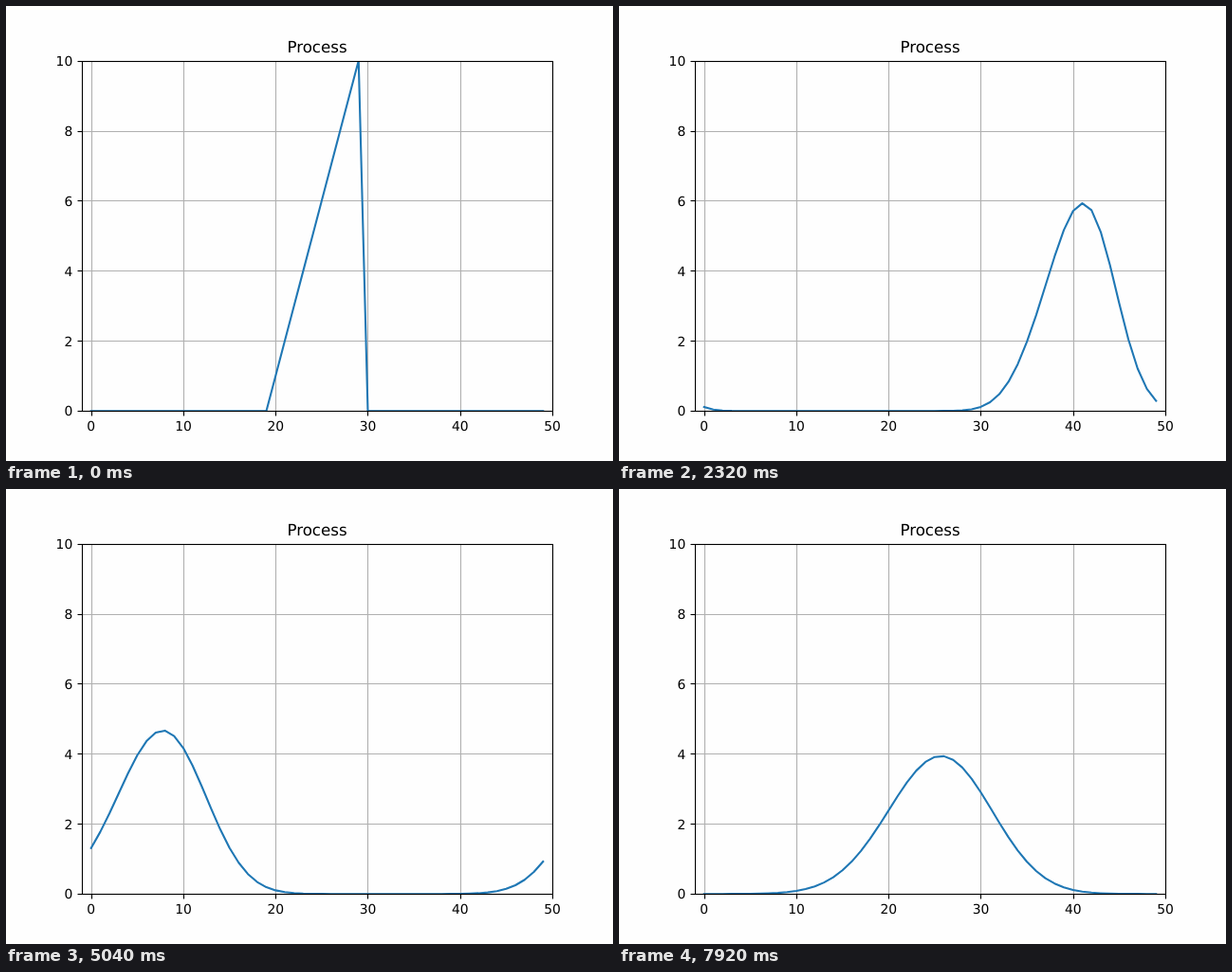
Recreate the animation shown at these times as an HTML page. Size 640 px wide and 480 px high, loop 8 s.

```html
<!DOCTYPE html>
<html lang="en">
<head>
<meta charset="utf-8">
<title>Process</title>
<style>
  html, body { margin: 0; width: 100%; height: 100%; overflow: hidden; background: #fefefe; }
  svg { display: block; }
  text { font-family: "DejaVu Sans", sans-serif; font-size: 13.89px; text-rendering: geometricPrecision; }
  .title { font-size: 16.67px; }
  .grid { stroke: #b0b0b0; stroke-width: 1.11; }
  .tick { stroke: #000; stroke-width: 1.11; }
  .spine { fill: none; stroke: #000; stroke-width: 1.11; }
  .curve { fill: none; stroke: #1f77b4; stroke-width: 2.083; stroke-linejoin: round; stroke-linecap: square; }
</style>
</head>
<body>
<svg width="640" height="480" viewBox="0 0 640 480">
  <clipPath id="area"><rect x="80" y="58" width="497" height="370"/></clipPath>
  <g id="axes"></g>
  <g clip-path="url(#area)"><polyline id="curve" class="curve"/></g>
  <rect class="spine" x="80.5" y="58.5" width="496" height="369"/>
  <text class="title" x="328" y="49" text-anchor="middle">Process</text>
</svg>
<script>
const STEP = 80, FRAMES = 100, CELLS = 50;
const axes = document.getElementById("axes");
const curve = document.getElementById("curve");

const xPos = v => 80 + (v + 1) * 496 / 51;
const yPos = v => 427.2 - v * 36.96;
const snap = p => Math.floor(p + 0.5) + 0.5;

function add(tag, attrs, content = "") {
  const el = document.createElementNS("http://www.w3.org/2000/svg", tag);
  for (const key in attrs) el.setAttribute(key, attrs[key]);
  el.textContent = content;
  axes.append(el);
}

function line(cls, x1, y1, x2, y2) {
  add("line", { class: cls, x1, y1, x2, y2 });
}

for (let v = 0; v <= 50; v += 10) {
  const x = snap(xPos(v));
  line("grid", x, 58, x, 428);
  line("tick", x, 427.5, x, 432.5);
  add("text", { x: xPos(v), y: 448, "text-anchor": "middle" }, v);
}
for (let v = 0; v <= 10; v += 2) {
  const y = snap(yPos(v));
  line("grid", 80, y, 577, y);
  line("tick", 75.5, y, 80.5, y);
  add("text", { x: 70.28, y: Math.round(yPos(v) + 5.28), "text-anchor": "end" }, v);
}

// Upwind transport on a ring: each step averages a cell with its left neighbour.
const states = [Array.from({ length: CELLS }, (_, i) => i > 19 && i < 30 ? i - 19 : 0)];
while (states.length < FRAMES) {
  const u = states[states.length - 1];
  states.push(u.map((v, i) => (v + u[(i + CELLS - 1) % CELLS]) / 2));
}

function draw(time) {
  const u = states[Math.floor(time / STEP) % FRAMES];
  curve.setAttribute("points", u.map((v, i) => xPos(i).toFixed(3) + "," + yPos(v).toFixed(3)).join(" "));
}

const start = performance.now();
function tick() {
  draw(performance.now() - start);
  requestAnimationFrame(tick);
}
tick();
</script>
</body>
</html>
```
